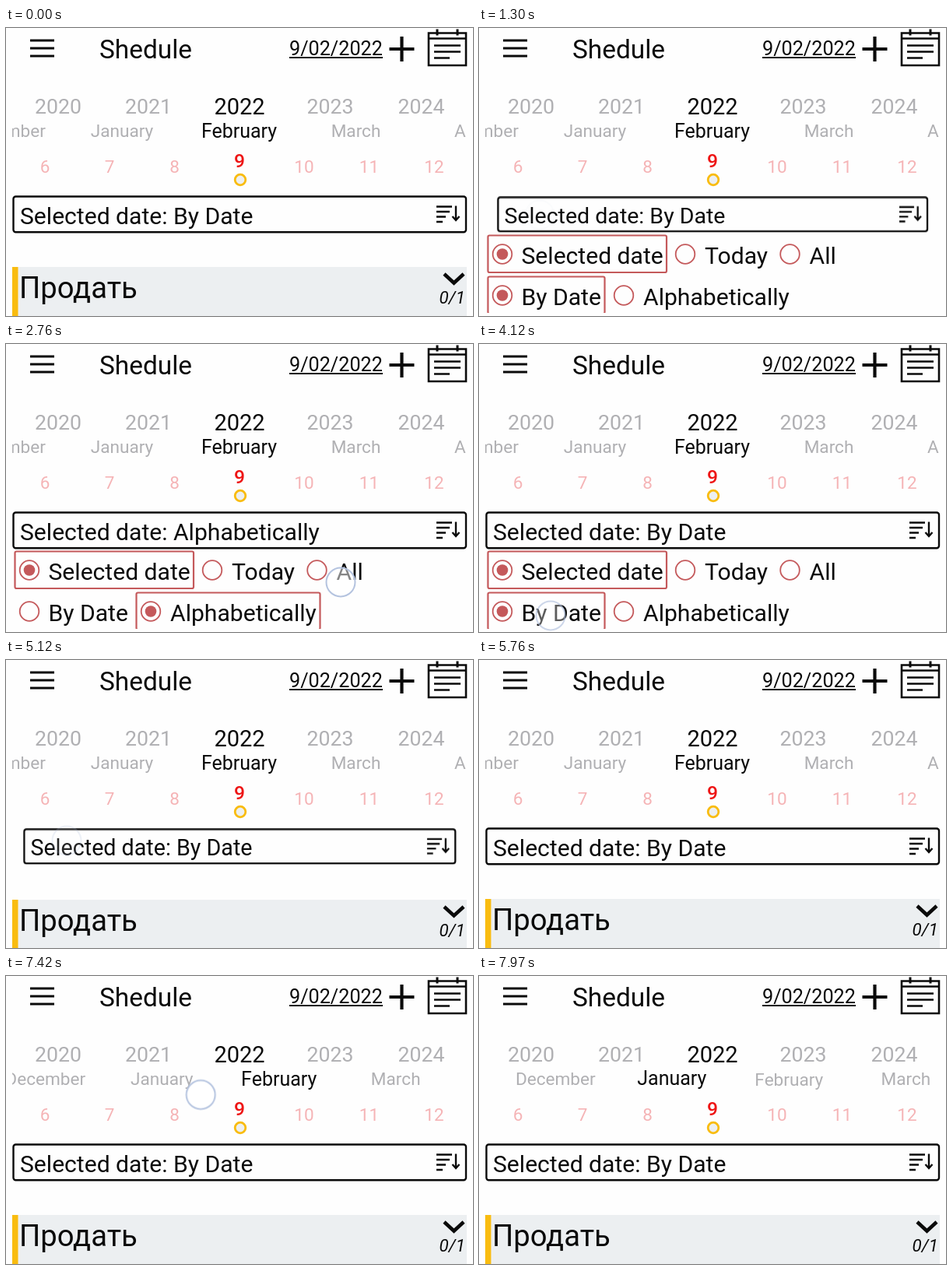
These frames come from a looping animation (600 by 370 pixels, 8000 ms). An HTML page:

```html
<!DOCTYPE html>
<html lang="en">
<head>
<meta charset="utf-8">
<title>Schedule</title>
<style>
  html, body { margin: 0; width: 100%; height: 100%; overflow: hidden; background: #fefefe; }
  svg { display: block; width: 100vw; height: 100vh; font-family: Roboto, sans-serif; fill: #0a0a0a; }
  .line { fill: none; stroke: #0a0a0a; }
  .mid { text-anchor: middle; }
  .years { font-size: 26.7px; fill: #b0b0b3; }
  .months { font-size: 22.6px; fill: #b0b0b3; }
  .days { font-size: 22.5px; fill: #f5b4b6; }
  .label { font-size: 30.1px; }
  .radio { fill: none; stroke: #c4595b; stroke-width: 1.8; }
  .mark rect { fill: none; stroke: #c4595b; stroke-width: 2.2; }
  .mark circle { fill: #c4595b; }

  .loop, .tap { animation: 8s linear infinite; }
  .step { animation: 8s step-end infinite; }

  /* Filter choices */
  .alpha { animation-name: alpha; }
  .date { animation-name: date; }
  .all { animation-name: all; }
  .selected { animation-name: selected; }
  @keyframes alpha { 0% { opacity: 0 } 25.75% { opacity: 1 } 51%, 100% { opacity: 0 } }
  @keyframes date { 0% { opacity: 1 } 25.75% { opacity: 0 } 51%, 100% { opacity: 1 } }
  @keyframes all { 0% { opacity: 0 } 34.875% { opacity: 1 } 45.625%, 100% { opacity: 0 } }
  @keyframes selected { 0% { opacity: 1 } 34.875% { opacity: 0 } 45.625%, 100% { opacity: 1 } }

  /* Filter bar press and the list sliding off the options */
  .bar { transform-origin: 300px 239.5px; animation-name: press; }
  .list { animation-name: slide; }
  @keyframes press {
    0%, 12.6% { transform: scale(1) }
    16.3% { transform: scale(.948) }
    20.1%, 60.4% { transform: scale(1) }
    64.2% { transform: scale(.95) }
    67.9%, 100% { transform: scale(1) }
  }
  @keyframes slide {
    0%, 13.1% { transform: translateY(0) }
    16.1%, 61% { transform: translateY(106px) }
    64.04%, 100% { transform: translateY(0) }
  }

  /* Month strip */
  .pan { animation-name: pan; }
  @keyframes pan {
    0%, 75% { transform: translateX(0); animation-timing-function: ease-in-out }
    84.8%, 85.4% { transform: translateX(-120px); animation-timing-function: ease-in-out }
    95.5% { transform: translateX(82px); animation-timing-function: ease-out }
    100% { transform: translateX(99px) }
  }
  .jan { animation-name: jan; }
  .feb { animation-name: feb; }
  .mar { animation-name: mar; }
  @keyframes jan {
    0% { fill: #b0b0b3; font-size: 22.6px }
    94.2%, 100% { fill: #0a0a0a; font-size: 25px }
  }
  @keyframes feb {
    0%, 88.7% { fill: #0a0a0a; font-size: 25px }
    80.7%, 94.2%, 100% { fill: #b0b0b3; font-size: 22.6px }
  }
  @keyframes mar {
    0%, 88.7%, 100% { fill: #b0b0b3; font-size: 22.6px }
    80.7% { fill: #0a0a0a; font-size: 25px }
  }

  /* Touches */
  .touch { fill: #fff; fill-opacity: .5; stroke: #b4c3df; stroke-width: 2; opacity: 0; }
  .tap { animation-name: tap; animation-delay: var(--at); }
  .drag { animation-name: drag; }
  @keyframes tap { 0% { opacity: 0 } .75%, 2.6% { opacity: 1 } 4.6%, 100% { opacity: 0 } }
  @keyframes drag {
    0%, 75% { opacity: 0; transform: translate(199px, 124px); animation-timing-function: ease-in-out }
    75.8% { opacity: 1 }
    84.8%, 85.4% { transform: translate(79px, 139px); animation-timing-function: ease-in-out }
    95.5% { opacity: 1; transform: translate(281px, 155px) }
    97.5%, 100% { opacity: 0; transform: translate(281px, 155px) }
  }
</style>
</head>
<body>
<svg viewBox="0 0 600 370">
  <clipPath id="strip"><rect x="8" y="80" width="584" height="130"/></clipPath>

  <!-- Header -->
  <path class="line" stroke-width="3.2" d="M31 16h31M31 26h31M31 36h31"/>
  <text x="120" y="39" font-size="33.4">Shedule</text>
  <text x="364" y="35" font-size="25.2">9/02/2022</text>
  <path class="line" stroke-width="1.8" d="M364 38h120"/>
  <path class="line" stroke-width="4.2" d="M492.5 27h32M508.5 11v32"/>
  <g class="line">
    <path stroke-width="2.6" d="M543 6.5h48v41.5h-48zM543 13.500h48"/>
    <path stroke-width="3" d="M554 1.5v8M580 1.5v8"/>
    <path stroke-width="2.6" d="M550 22.5h34M550 30.5h34M550 38.500h20"/>
  </g>

  <!-- Date pickers -->
  <g clip-path="url(#strip)" class="mid">
    <g class="years">
      <text x="67" y="110">2020</text>
      <text x="183" y="110">2021</text>
      <text x="300" y="110.5" font-size="29" fill="#0a0a0a">2022</text>
      <text x="416.5" y="110">2023</text>
      <text x="533.5" y="110">2024</text>
    </g>
    <g class="months loop pan">
      <text x="-.5" y="140">December</text>
      <text x="149" y="140" class="step jan">January</text>
      <text x="299.5" y="140.5" class="step feb">February</text>
      <text x="449.5" y="140" class="step mar">March</text>
      <text x="599" y="140">April</text>
    </g>
    <g class="days">
      <text x="50" y="185.5">6</text>
      <text x="133" y="185.5">7</text>
      <text x="216.5" y="185.5">8</text>
      <text x="300" y="179" font-size="24.7" font-weight="500" fill="#ee1515">9</text>
      <text x="383" y="185.5">10</text>
      <text x="466.5" y="185.5">11</text>
      <text x="550" y="185.5">12</text>
    </g>
  </g>
  <circle cx="301" cy="195" r="6.8" fill="#eceff1" stroke="#f9bc10" stroke-width="2.8"/>

  <!-- Filter options -->
  <g class="label">
    <g class="radio">
      <circle cx="30" cy="290.5" r="12.3"/>
      <circle cx="265" cy="290.5" r="12.3"/>
      <circle cx="399.5" cy="290.5" r="12.3"/>
      <circle cx="30" cy="343.5" r="12.3"/>
      <circle cx="186" cy="343.5" r="12.3"/>
    </g>
    <text x="54.5" y="303">Selected date</text>
    <text x="290" y="303">Today</text>
    <text x="424.5" y="303">All</text>
    <text x="54.5" y="356">By Date</text>
    <text x="211" y="356">Alphabetically</text>
    <g class="mark step selected">
      <rect x="11.5" y="266.5" width="229.5" height="47.5" rx="2"/>
      <circle cx="30" cy="290.5" r="7.3"/>
    </g>
    <g class="mark step all">
      <rect x="381" y="266.5" width="82" height="47.5" rx="2"/>
      <circle cx="399.5" cy="290.5" r="7.3"/>
    </g>
    <g class="mark step date">
      <rect x="11.5" y="319.5" width="150" height="47.5" rx="2"/>
      <circle cx="30" cy="343.5" r="7.3"/>
    </g>
    <g class="mark step alpha">
      <rect x="167.5" y="319.5" width="236" height="47.5" rx="2"/>
      <circle cx="186" cy="343.5" r="7.3"/>
    </g>
  </g>

  <!-- Task list -->
  <g class="loop list">
    <rect y="260" width="600" height="120" fill="#fefefe"/>
    <rect x="8" y="307" width="584" height="80" fill="#eceff1"/>
    <rect x="8" y="307" width="7.5" height="80" fill="#f9bc10"/>
    <text x="17" y="347" font-size="38.2">Продать</text>
    <path class="line" stroke-width="4.6" d="M563 316l12.5 11.5 12.5-11.5"/>
    <text x="556.5" y="354" font-size="22.4" font-style="italic">0/1</text>
  </g>

  <!-- Filter bar -->
  <g class="loop bar label">
    <rect x="9.5" y="216.5" width="581.5" height="45.8" rx="3" fill="#fefefe" stroke="#0a0a0a" stroke-width="2.4"/>
    <text x="18" y="251.5" class="step date">Selected date: By Date</text>
    <g class="step alpha">
      <text x="18" y="251.5" class="step selected">Selected date: Alphabetically</text>
      <text x="18" y="251.5" class="step all">All: Alphabetically</text>
    </g>
    <path class="line" stroke-width="2.4" d="M553 229.5h20M553 236h17M553 242.500h12M553 249h8M578 228.500v18M573.5 242l4.5 5 4.5-5"/>
  </g>

  <!-- Touches -->
  <g>
    <circle class="touch tap" cx="78" cy="240" r="18.5" style="--at:940ms"/>
    <circle class="touch tap" cx="300" cy="345" r="18.5" style="--at:1900ms"/>
    <circle class="touch tap" cx="430" cy="306" r="18.5" style="--at:2580ms"/>
    <circle class="touch tap" cx="120" cy="298" r="18.5" style="--at:3450ms"/>
    <circle class="touch tap" cx="92" cy="349" r="18.5" style="--at:3860ms"/>
    <circle class="touch tap" cx="78" cy="232" r="18.5" style="--at:4790ms"/>
    <circle class="touch loop drag" r="18.5"/>
  </g>
</svg>
</body>
</html>
```
